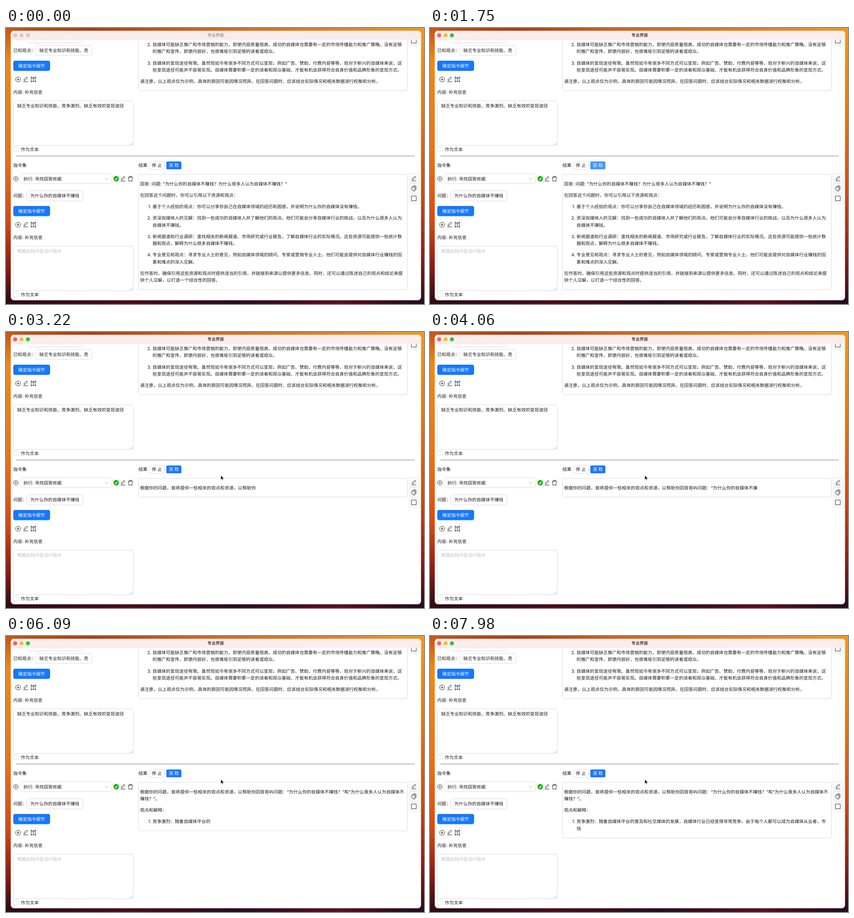
An HTML page for the animation above (8 s loop, 920x608 px).

```html
<!DOCTYPE html>
<html lang="zh-CN">
<head>
<meta charset="utf-8">
<title>专业界面</title>
<style>
html, body { margin: 0; width: 100%; height: 100%; overflow: hidden; background: #2a0b14; }
svg { display: block; width: 920px; height: 608px; }
text {
  font: 9.8px Inter, "Noto Sans CJK SC", "Noto Sans CJK", sans-serif;
  fill: #1a1a1a; white-space: pre;
  text-rendering: geometricPrecision; text-spacing-trim: space-all;
}
.mid { text-anchor: middle; }
.end { text-anchor: end; }
.hint { fill: #bfbfbf; }
.white { fill: #fff; font-weight: 500; }
.field { fill: #fff; stroke: #d9d9d9; stroke-width: .9; }
.blue { fill: #1677ff; }
.icon { fill: none; stroke: #222; stroke-width: 1; stroke-linejoin: round; }
.bar { fill: #f7eeed; animation: bar 8s step-end infinite; }
.title { font-size: 9.1px; font-weight: 700; fill: #4b4444; animation: title 8s step-end infinite; }
.light { animation: light 8s step-end infinite; }
.get { animation: get 8s linear infinite; }
.wave { fill: none; stroke: #1677ff; opacity: 0; animation: wave 8s linear infinite; }
.cursor { animation: cursor 8s step-end infinite; }
@keyframes bar { 0% { fill: #f5eeec; } .875% { fill: #f8eeed; } }
@keyframes title { 0% { fill: #a9a09f; } .875% { fill: #4b4444; } }
@keyframes light { 0% { fill: #d5cccb; stroke: #c6bdbc; } .875% { fill: var(--c); stroke: var(--c); } }
@keyframes get {
  0%, 6.1% { fill: #1677ff; }
  8.6%, 14.8% { fill: #4096ff; }
  16.3% { fill: #1f6ce0; }
  18.8%, 28.8% { fill: #4096ff; }
  30.6%, 100% { fill: #1677ff; }
}
@keyframes wave {
  0%, 16.3% { opacity: 0; stroke-width: 0; }
  16.4% { opacity: .22; stroke-width: 1; }
  18% { opacity: .13; stroke-width: 7; }
  20% { opacity: .06; stroke-width: 8.4; }
  23.7%, 100% { opacity: 0; stroke-width: 8.4; }
}
@keyframes cursor { 0% { opacity: 0; } 30.625% { opacity: 1; } }
</style>
</head>
<body>
<svg viewBox="0 0 920 608">
  <defs>
    <linearGradient id="left" x2="0" y2="1">
      <stop stop-color="#c9530f"/><stop offset=".12" stop-color="#ee8a17"/>
      <stop offset=".45" stop-color="#ea7411"/><stop offset=".7" stop-color="#d9480d"/>
      <stop offset=".86" stop-color="#8e1c10"/><stop offset="1" stop-color="#2a0a14"/>
    </linearGradient>
    <linearGradient id="right" x2="0" y2="1">
      <stop stop-color="#f2991c"/><stop offset=".3" stop-color="#e8760f"/>
      <stop offset=".6" stop-color="#d2480f"/><stop offset=".82" stop-color="#8a1d17"/>
      <stop offset="1" stop-color="#200a1c"/>
    </linearGradient>
    <linearGradient id="top">
      <stop stop-color="#c9530f"/><stop offset=".2" stop-color="#b33a0c"/>
      <stop offset=".45" stop-color="#d9610f"/><stop offset=".75" stop-color="#e67f14"/>
      <stop offset="1" stop-color="#f2991c"/>
    </linearGradient>
    <linearGradient id="bottom">
      <stop stop-color="#2a0a14"/><stop offset=".3" stop-color="#4a0d1c"/>
      <stop offset=".55" stop-color="#2b0a20"/><stop offset=".8" stop-color="#5a1020"/>
      <stop offset="1" stop-color="#200a1c"/>
    </linearGradient>
    <clipPath id="page"><path d="M10 26.5H914V600H10z"/></clipPath>

    <g id="plus" class="icon"><circle r="5.4"/><path d="M-2.8 0h5.6M0-2.8v5.6"/></g>
    <g id="pen" class="icon"><path d="M-5.2 5.3H5.2M-3.8 2.7l.5-2.7L2.4-5.4 4.5-3.3-1.2 2.2z"/></g>
    <g id="frame" class="icon">
      <path d="M-4.6-4.6h9.2v9.2h-9.2zM-2.4-1.6v-.9h4.8v.9M0-2.5v5.2M-1 2.7h2" stroke-width=".9"/>
      <path d="M-5.8-5.8h2v2h-2zm9.6 0h2v2h-2zm-9.6 9.6h2v2h-2zm9.6 0h2v2h-2z" fill="#222" stroke="none"/>
    </g>
    <g id="bin" class="icon"><path d="M-5.3-3.3H5.3M-2.2-3.5v-1.8h4.4v1.8M-4-3.2l.5 8.5h7l.5-8.5"/></g>
    <g id="copy" class="icon"><path d="M-2.8-5.4h7.4v9.2M-4.5-3.4h6.8v9h-4l-2.8-2.6z"/></g>
    <path id="square" class="icon" d="M-5.3-5.3H5.3V5.3H-5.3z"/>
  </defs>

  <path fill="url(#top)" d="M0 0h920v14H0z"/>
  <path fill="url(#bottom)" d="M0 590h920v18H0z"/>
  <path fill="url(#left)" d="M0 0h20v608H0z"/>
  <path fill="url(#right)" d="M904 0h16v608h-16z"/>
  <rect x="10.5" y="6" width="903" height="593.7" rx="7" fill="#fff"/>
  <path class="bar" d="M10.5 26.3V13a7 7 0 0 1 7-7h889a7 7 0 0 1 7 7v13.3z"/>
  <g stroke-width=".5">
    <circle class="light" style="--c:#fc5b57" cx="20.2" cy="16.2" r="4.1"/>
    <circle class="light" style="--c:#fdbc2e" cx="34.2" cy="16.2" r="4.1"/>
    <circle class="light" style="--c:#29c33f" cx="48.2" cy="16.2" r="4.1"/>
  </g>
  <text class="title mid" x="461.5" y="19.4">专业界面</text>

  <g id="ui" clip-path="url(#page)"></g>

  <rect class="field" x="315.5" y="294.4" width="33" height="16.8" rx="2.8"/>
  <text class="mid" x="332" y="306.4">停 止</text>
  <rect class="wave" x="353" y="294" width="33" height="17.2" rx="3"/>
  <rect class="get" x="353" y="294" width="33" height="17.2" rx="2.8"/>
  <text class="mid white" x="369.5" y="306.4">获 取</text>

  <rect id="box" class="field" x="291.7" y="322.3" width="591.8" rx="2.8"/>
  <g id="before"></g>
  <g id="answer"></g>
  <path class="cursor" transform="translate(472.8 315.6)" d="M0 0v9.8l2.2-2 1.5 3.4 1.6-.7-1.5-3.3h3.1z" stroke="#fff" stroke-width=".7"/>
</svg>
<script>
const LOOP = 8000, FRAME = 70, LINE = 15.4, PARA = 25.2, LEFT = 295, ITEM = 322.6, MARK = 319.8;
const $ = id => document.getElementById(id);

function add(parent, tag, attrs) {
  const el = document.createElementNS("http://www.w3.org/2000/svg", tag);
  for (const k in attrs) el.setAttribute(k, attrs[k]);
  return parent.appendChild(el);
}
// y is the middle of the line
function label(parent, x, y, str, cls = "") {
  const el = add(parent, "text", { x, y: y + 3.6, class: cls });
  el.textContent = str;
  return el;
}
const ui = $("ui");
const rect = (x, y, width, height, rx = 4.2, cls = "field") =>
  add(ui, "rect", { x, y, width, height, rx, class: cls });
const icon = (name, x, y, s = 1) =>
  add(ui, "use", { href: "#" + name, transform: `translate(${x} ${y}) scale(${s})` });
function field(y, name, x, value) {
  label(ui, 16, y, name);
  rect(x, y - 11.2, 124, 22.2);
  label(ui, x + 8.2, y, value);
}
function tool(name, y) {
  rect(888.2, y - 9.8, 19.2, 19.6, 2.8);
  icon(name, 897.7, y);
}
function panel(dy, value, cls) {
  rect(16, 72 + dy, 81, 22.4, 4.2, "blue");
  label(ui, 56.5, 83.2 + dy, "确定指令细节", "white mid");
  icon("plus", 26.5, 113.3 + dy);
  icon("pen", 43.3, 113 + dy);
  icon("frame", 60.3, 113.3 + dy);
  label(ui, 16, 141.3 + dy, "内容: 补充信息");
  rect(16.4, 160.5 + dy, 263.8, 98.3);
  label(ui, 24.4, 171.4 + dy, value, cls);
  add(ui, "path", { d: `M273.5 ${257.5 + dy}l5-5m-2 5l2-2`, stroke: "#888", "stroke-width": .7 });
  rect(16.4, 261.7 + dy, 10.6, 10.6, 2.8);
  label(ui, 32.8, 267.2 + dy, "作为文本");
}

field(22, "问题：", 45.4, "为什么你的自媒体不赚钱");
field(49.7, "已知观点：", 65.2, "缺乏专业知识和技能、竞");
panel(0, "缺乏专业知识和技能、竞争激烈、缺乏有效的变现途径");
rect(291.7, 10, 591.8, 128, 2.8);
[
  [MARK, 36.4, "2.", "end"],
  [ITEM, 36.4, "自媒体可能缺乏推广和市场营销的能力。即使内容质量很高，成功的自媒体也需要有一定的市场传播能力和推广策略。没有足够"],
  [ITEM, 51.8, "的推广和宣传，即使内容好，也很难吸引到足够的读者或观众。"],
  [MARK, 77, "3.", "end"],
  [ITEM, 77, "自媒体的变现途径有限。虽然现如今有很多不同方式可以变现，例如广告、赞助、付费内容等等，但对于新兴的自媒体来说，这"],
  [ITEM, 92.4, "些变现途径可能并不容易实现。自媒体需要积累一定的读者和观众基础，才能有机会获得符合自身价值和品牌形象的变现方式。"],
  [LEFT, 117.6, "请注意，以上观点仅为示例，具体的原因可能因情况而异。在回答问题时，应该结合实际情况和相关数据进行权衡和分析。"]
].forEach(l => label(ui, ...l));
tool("square", 28);

add(ui, "path", { d: "M22.5 282H900", stroke: "#a3a3a3", "stroke-width": 1.3 });
label(ui, 16, 302, "指令集");
icon("plus", 21.7, 332, .92);
rect(30.4, 320.8, 202.6, 22);
label(ui, 38.4, 332, "执行: 寻找回答依据");
add(ui, "path", { d: "M218.3 330.2l3.5 3.8 3.5-3.8", fill: "none", stroke: "#bfbfbf" });
add(ui, "circle", { cx: 242.6, cy: 332, r: 6.1, fill: "#12b312" });
add(ui, "path", { d: "M239.8 332l2.1 2.2 3.6-4.2", fill: "none", stroke: "#fff", "stroke-width": 1.4 });
icon("pen", 257.6, 332);
icon("bin", 274, 332);
field(369.8, "问题：", 45.4, "为什么你的自媒体不赚钱");
panel(320, "根据此段内容运行指令", "hint");
label(ui, 291.5, 302.6, "结果");
tool("pen", 331.6);
tool("copy", 353.4);
tool("square", 375.3);

// Each line: x, gap above it, text, class
function block(parent, lines) {
  let y = 343;
  return lines.map(([x, gap, str, cls]) => {
    y += gap;
    return { y, str, mark: cls === "end", el: label(parent, x, y, str, cls) };
  });
}
const before = block($("before"), [
  [LEFT, 0, "回答: 问题: \"为什么你的自媒体不赚钱？为什么很多人认为自媒体不赚钱？\""],
  [LEFT, PARA, "在回答这个问题时，你可以引用以下资源和观点："],
  [MARK, PARA, "1.", "end"],
  [ITEM, 0, "基于个人经验的观点：你可以分享你自己在自媒体领域的经历和困惑，并说明为什么你的自媒体没有赚钱。"],
  [MARK, PARA, "2.", "end"],
  [ITEM, 0, "资深自媒体人的见解：找到一些成功的自媒体人并了解他们的观点。他们可能会分享自媒体行业的挑战，以及为什么很多人认为"],
  [ITEM, LINE, "自媒体不赚钱。"],
  [MARK, PARA, "3.", "end"],
  [ITEM, 0, "新闻报道和行业调研：查找相关的新闻报道、市场研究或行业报告，了解自媒体行业的实际情况。这些资源可能提供一些统计数"],
  [ITEM, LINE, "据和观点，解释为什么很多自媒体不赚钱。"],
  [MARK, PARA, "4.", "end"],
  [ITEM, 0, "专业意见和观点：寻求专业人士的意见，例如自媒体领域的顾问、专家或营销专业人士。他们可能会提供对自媒体行业赚钱的因"],
  [ITEM, LINE, "素和难点的深入见解。"],
  [LEFT, PARA, "在作答时，确保引用这些资源和观点时提供适当的引用，并链接到来源以提供更多信息。同时，还可以通过陈述自己的观点和结论来提"],
  [LEFT, LINE, "供个人见解，以打造一个综合性的回答。"]
]);
const answer = block($("answer"), [
  [LEFT, 0, "根据你的问题，我将提供一些相关的观点和资源，以帮助你回答答屿问题：“为什么你的自媒体不赚钱？”和“为什么很多人认为自媒体不"],
  [LEFT, LINE, "赚钱？”。"],
  [LEFT, PARA, "观点和解释："],
  [MARK, PARA, "1.", "end"],
  [ITEM, 0, "竞争激烈：随着自媒体平台的普及和社交媒体的发展，自媒体行业已经变得非常竞争。由于每个人都可以成为自媒体从业者，市"],
  [ITEM, LINE, "场"]
]);

// Bursts of typing: start, count, end, count
const bursts = [
  [2310, 1, 3080, 23], [3150, 24, 3360, 29], [3500, 31, 3920, 43], [4060, 44, 4550, 58],
  [4690, 59], [4830, 62, 5180, 72], [5250, 73], [5390, 74, 5530, 76], [5670, 77, 5740, 78],
  [5880, 81], [6020, 84, 6300, 91], [6440, 93, 7000, 107], [7140, 109], [7280, 112, 7560, 122],
  [7700, 124, 7770, 126], [7910, 130], [7980, 131]
];
function typed(t) {
  let n = 0;
  for (const [t0, n0, t1 = t0 + 1, n1 = n0] of bursts) {
    if (t < t0) break;
    n = Math.round(n0 + (n1 - n0) * Math.min(1, (t - t0) / (t1 - t0)));
  }
  return n;
}

let start, shown = -1;
function tick(now) {
  start ??= now;
  const t = (now - start) % LOOP;
  let n = typed(Math.floor(t / FRAME) * FRAME);
  if (n !== shown) {
    shown = n;
    let last = before.at(-1).y;
    $("before").style.display = n ? "none" : "";
    for (const { y, str, mark, el } of answer) {
      const len = mark ? 1 : str.length;
      el.textContent = n <= 0 ? "" : mark ? str : str.slice(0, n);
      if (n > 0) last = y;
      n -= len;
    }
    $("box").setAttribute("height", last + 20.6 - 322.3);
  }
  requestAnimationFrame(tick);
}
requestAnimationFrame(tick);
</script>
</body>
</html>
```
